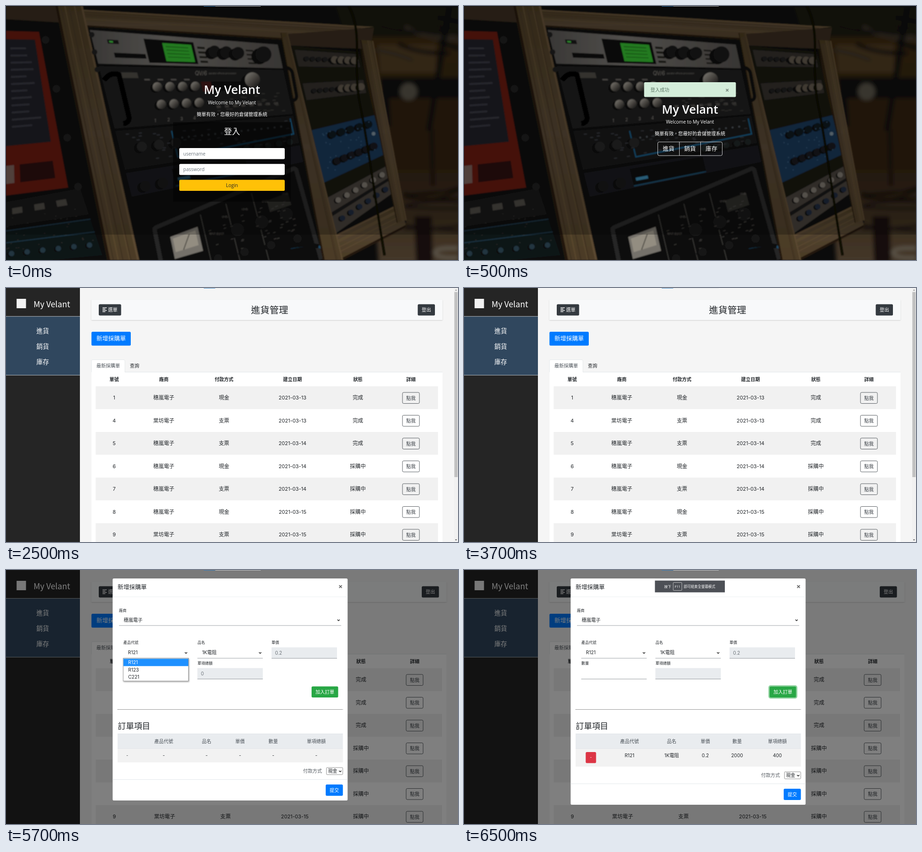
Recreate the animation shown at these times as an HTML page. Size 960 px wide and 540 px high, loop 8 s.

```html
<!DOCTYPE html>
<html lang="zh-Hant">
<head>
<meta charset="utf-8">
<title>My Velant</title>
<style>
html, body { margin: 0; width: 100%; height: 100%; overflow: hidden; background: #0b0b0b; }
svg { display: block; width: 100vw; height: 100vh; }
text { font-family: Inter, "Noto Sans CJK TC", "Noto Sans CJK", sans-serif; font-weight: 300; white-space: pre; }
.ui { font-family: "Open Sans", "Noto Sans CJK TC", "Noto Sans CJK", sans-serif; font-weight: 400; }
.cjk { font-family: "Noto Sans CJK TC", "Noto Sans CJK", sans-serif; font-weight: 400; }
.reg { font-weight: 400; }
.mid { font-weight: 500; }
.semi { font-weight: 600; }
</style>
</head>
<body>
<svg id="stage" viewBox="0 0 960 540" preserveAspectRatio="none">
<defs>
<filter id="soft" x="-10%" y="-10%" width="120%" height="120%"><feGaussianBlur stdDeviation="4"/></filter>
<filter id="fine"><feGaussianBlur stdDeviation=".8"/></filter>
<filter id="shade" x="-5%" y="-20%" width="110%" height="150%"><feDropShadow dx="0" dy="1" stdDeviation="1.2" flood-opacity=".16"/></filter>
<filter id="drop" x="-10%" y="-10%" width="125%" height="135%"><feDropShadow dx="1" dy="1.5" stdDeviation="1.5" flood-opacity=".4"/></filter>
<linearGradient id="wood" x2="0" y2="1"><stop stop-color="#43361f"/><stop offset=".5" stop-color="#514230"/><stop offset="1" stop-color="#4b3b26"/></linearGradient>
<linearGradient id="wall" x2="0" y2="1"><stop stop-color="#33250f"/><stop offset=".6" stop-color="#2a1d0e"/><stop offset="1" stop-color="#45382a"/></linearGradient>
<linearGradient id="metal"><stop stop-color="#4c4a48"/><stop offset=".4" stop-color="#6b6864"/><stop offset="1" stop-color="#4a4744"/></linearGradient>
<linearGradient id="cap" y2="1"><stop stop-color="#aaa59c"/><stop offset=".5" stop-color="#5f5b55"/><stop offset="1" stop-color="#151413"/></linearGradient>
</defs>
</svg>
<script>
const BRAND = 'My Velant', SHOPS = ['穗嵐電子', '棠坊電子'], PAGES = ['進貨', '銷貨', '庫存'];
const DARK = '#212529', BLUE = '#007bff', COAL = '#343a40', GREY = '#6c757d', PALE = '#e9ecef';

// y is the visual middle of the line of text
const text = (x, y, s, size = 10, fill = DARK, cls = '', anchor = 'start') =>
  `<text x="${x}" y="${(y + size * .37).toFixed(2)}" font-size="${size}" fill="${fill}" class="${cls}" text-anchor="${anchor}">${s}</text>`;
const mid = (x, y, s, size, fill, cls) => text(x, y, s, size, fill, cls, 'middle');
const box = (x, y, x2, y2, fill, r = 0, more = '') =>
  `<rect x="${x}" y="${y}" width="${x2 - x}" height="${y2 - y}" rx="${r}" fill="${fill}" ${more}/>`;
const path = (d, color, w = 1, more = '') => `<path d="${d}" fill="none" stroke="${color}" stroke-width="${w}" ${more}/>`;
const poly = (points, fill) => `<polygon points="${points}" fill="${fill}"/>`;
const dot = (x, y, r, fill) => `<circle cx="${x}" cy="${y}" r="${r}" fill="${fill}"/>`;
const rule = (x, x2, y, color = '#dee2e6', w = .8) => path(`M${x} ${y}H${x2}`, color, w);
const group = (s, more = '') => `<g ${more}>${s}</g>`;
const times = (n, f) => Array.from({ length: n }, (_, i) => f(i)).join('');
const each = (list, f) => list.map(f).join('');
const button = (x, y, x2, y2, fill, s, size = 10, color = '#fff', cls = '') =>
  box(x, y, x2, y2, fill, 2.5) + mid((x + x2) / 2, (y + y2) / 2, s, size, color, cls);
const outline = (x, y, x2, y2, color, r = 2.5, w = .8) => box(x, y, x2, y2, 'none', r, `stroke="${color}" stroke-width="${w}"`);
const chevron = (x, y) => path(`M${x - 2.4} ${y - 1.2}l2.4 2.4l2.4 -2.4`, '#111', 1.3);
const cross = (x, y, r, color) => path(`M${x - r} ${y - r}l${2 * r} ${2 * r}m0 ${-2 * r}l${-2 * r} ${2 * r}`, color, 1.7);

let seed = 7;
const rnd = (a, b) => a + (b - a) * (seed = seed * 16807 % 2147483647) / 2147483647;
const mix = (a, b, k) => a + (b - a) * k;

// a flat surface seen at an angle, given by its corners; u runs across, v down
function face(tl, tr, bl, br) {
  const at = (u, v) => [0, 1].map(k => +mix(mix(tl[k], tr[k], u), mix(bl[k], br[k], u), v).toFixed(1));
  const patch = (u, v, u2, v2, fill) => poly([at(u, v), at(u2, v), at(u2, v2), at(u, v2)].join(' '), fill);
  const spot = (u, v, r, fill) => dot(...at(u, v), r, fill);
  const row = (n, u, u2, f) => times(n, i => f(mix(u, u2, n > 1 ? i / (n - 1) : 0), i));
  const knobs = (n, u, u2, v, r, fill = '#161616') => row(n, u, u2, k => {
    const [x, y] = at(k, v);
    return dot(x - r * .5, y + r * .25, r, '#070707') + dot(x, y, r, fill);
  });
  const marks = (n, u, v, u2, v2, fill) => times(n, () => {
    const a = rnd(u, u2), b = rnd(v, v2);
    return patch(a, b, a + .018, b + .007, fill);
  });
  const label = (u, v, s, size, fill = '#8d8982') => text(...at(u, v), s, size, fill);
  return { at, patch, spot, row, knobs, marks, label };
}

function room() {
  const back = face([785, 0], [965, 0], [820, 545], [965, 545]);
  return group(
    back.patch(-.2, 0, 1, 1, 'url(#wall)') +
    back.patch(-.6, 0, 1, .12, '#17130d') +
    back.patch(0, .15, .7, .26, '#43331a') +
    back.patch(0, .28, 1, .47, '#0e0c0a') +
    back.patch(.1, .36, 1, .48, '#2b1e0e') +
    back.patch(.6, .48, .65, .7, '#120d08') +
    back.patch(.35, .82, .6, 1, '#15110d') +
    times(9, i => path(`M${rnd(785, 930)} ${rnd(20, 100)}q40 ${rnd(-5, 30)} ${rnd(60, 150)} ${rnd(0, 30)}`, i % 3 ? '#0c0a08' : '#332c22', rnd(4, 10))) +
    times(8, () => path(`M845 ${rnd(370, 480)}q50 ${rnd(-30, 40)} 120 ${rnd(-30, 20)}`, '#130f0b', 5)) +
    path('M942 0L898 265M785 187H960', '#0a0908', 12) +
    path('M960 535C900 540 890 510 960 515', '#5c5548', 7) + dot(855, 182, 18, '#4b463c'), 'filter="url(#soft)"');
}

function leftRack() {
  const poster = face([0, 53], [70, 55], [0, 403], [132, 386]), low = face([0, 410], [155, 380], [0, 550], [205, 530]);
  return box(0, 0, 215, 540, '#0d0d0d') + poly('0,0 105,0 115,35 0,28', '#33281a') +
    poster.patch(0, 0, 1, 1, '#5c1710') + poster.patch(0, .05, .84, .7, '#1b1b21') +
    poster.row(12, .1, .58, v => poster.patch(.12, v, .62 + rnd(-.15, .1), v + .012, '#30313a')) +
    poster.patch(.24, .82, .82, .93, '#280d0b') + poster.patch(0, .82, .14, .93, '#6b5450') +
    low.patch(0, .05, 1, .42, '#171717') + low.patch(0, .5, 1, 1, '#0f1214') + low.patch(0, .48, 1, .495, '#1b3645') + low.patch(0, .66, 1, .675, '#1b3645') +
    low.row(3, .08, .65, u => low.patch(u, .16, u + .13, .25, '#45423e')) +
    low.knobs(6, .06, .9, .84, 6, '#22343f') + low.marks(30, 0, .3, .95, .8, '#3b3a38') +
    times(4, i => dot(84 + i * 23, 72 + i * 104, 8, '#1e1d1c'));
}

function units() {
  const f = face([178, 51], [577, 82], [268, 409], [632, 334]), corner = f.at(.31, .63);
  return poly('165,0 700,0 850,460 716,540 283,540', '#0e0e0e') +
    // silver unit
    f.patch(0, 0, 1, .2, 'url(#metal)') + f.patch(.28, .03, .545, .185, '#0b0c0b') + f.patch(.375, .05, .53, .172, '#2fa32a') +
    f.row(4, .07, .14, v => f.patch(.39, v, .51, v + .006, '#1d6f1c')) +
    f.patch(.08, .05, .14, .075, '#171716') + f.patch(.09, .058, .11, .068, '#3cb43c') + f.patch(.1, .13, .27, .16, '#111') +
    f.row(4, .06, .16, v => f.patch(.56, v, .6, v + .015, '#1a1a19') + f.patch(.82, v, .86, v + .012, '#1a1a19')) +
    f.knobs(3, .648, .775, .09, 13) + f.knobs(1, .911, 0, .09, 17) +
    // effects unit
    f.patch(0, .215, 1, .585, '#1d1d1d') + f.patch(.1, .25, .2, .285, '#45423e') +
    f.label(.515, .25, 'QV/6', 11) + f.label(.59, .25, 'parallel effects processor', 5) +
    f.patch(.535, .31, .755, .38, '#0a0a0a') + f.patch(.535, .31, .59, .38, '#3d1512') +
    f.knobs(4, .291, .5, .342, 10, 'url(#cap)') + f.knobs(4, .29, .5, .456, 10, 'url(#cap)') + f.knobs(1, .82, 0, .297, 16, 'url(#cap)') +
    f.row(4, .23, .447, (u, i) => f.label(u, .555, i + 1, 9) + f.patch(u, .29, u + .03, .3, '#5a5752')) +
    f.row(8, .59, .91, u => f.patch(u, .48, u + .022, .5, '#45423f')) + f.marks(30, .56, .4, .95, .55, '#393734') +
    path('M208 158Q222 139 240 146L261 235Q263 248 249 250', '#060606', 11) +
    // blue framed unit
    f.patch(0, .6, 1, .83, '#151617') + path(`M${corner}L${f.at(.31, .8)}L${f.at(.98, .75)}L${f.at(.98, .62)}`, '#195a80', 2.5) +
    f.row(16, .36, .92, u => f.spot(u, .68, 2, '#4b5054')) + f.knobs(3, .125, .32, .708, 11, '#202020') + f.knobs(5, .7, .95, .81, 7, '#1f2021') +
    f.marks(40, .05, .62, .95, .8, '#34363a') +
    // dark unit
    f.patch(0, .85, 1, .99, '#16181a') + f.patch(.26, .87, .68, .975, '#08090a') + f.patch(.26, .975, .68, .983, '#1b4a66') +
    f.patch(.28, .93, .35, .95, '#35799c') + f.knobs(2, .088, .19, .945, 11, '#131416');
}

function amp() {
  const f = face([320, 475], [612, 350], [345, 600], [665, 540]), edge = (u, v) => f.at(u, v);
  return path(`M${edge(0, 1)}L${edge(0, 0)}L${edge(1, 0)}L${edge(1, 1)}`, '#262525', 18, 'stroke-linejoin="round"') +
    f.patch(0, 0, 1, 1, '#101010') +
    f.row(3, .31, .68, u => f.patch(u, .05, u + .004, 1, '#454340')) +
    f.patch(.08, .2, .275, .56, '#75716a') + f.patch(.095, .24, .255, .46, '#938d81') +
    path(`M${f.at(.15, .46)}L${f.at(.21, .26)}`, '#2a2825', 1.5) +
    f.knobs(3, .53, .87, .42, 14) + f.knobs(4, .36, .9, .72, 9) + f.patch(.77, .2, .92, .34, '#2b2927') +
    f.row(4, .45, .88, u => f.label(u, .19, 'LEVEL', 4.5)) + f.label(.34, .35, 'INPUT SELECT', 4.5) + f.marks(40, .34, .25, .93, .7, '#454340') +
    path('M604 514C650 505 680 505 688 540', '#1d4a66', 5) + path('M600 512Q635 504 664 511', '#0a0a0a', 9);
}

function rightRack() {
  const f = face([607, 85], [750, 97], [701, 483], [822, 397]);
  return f.patch(0, 0, 1, 1, '#131211') +
    each([.02, .2], v => f.patch(.03, v, .96, v + .09, '#2d2a27') + f.knobs(5, .18, .55, v + .045, 5, '#1c1b1a') + f.knobs(4, .6, .9, v + .045, 8, '#544d43')) +
    f.patch(0, .45, 1, .73, '#123250') + f.knobs(5, .3, .88, .5, 8, '#10151b') + f.knobs(6, .28, .88, .65, 8, '#14191e') +
    f.marks(30, .1, .47, .92, .7, '#33516b') + f.spot(.92, .57, 4, '#6d7d88') +
    f.patch(0, .81, 1, 1, '#403b35') + f.patch(0, .89, 1, .91, '#191715') +
    f.knobs(6, .15, .9, .85, 6, '#6f6a63') + f.knobs(6, .15, .9, .95, 6, '#1e2638');
}

function plank(...corners) {
  const f = face(...corners);
  return f.patch(0, 0, 1, 1, 'url(#wood)') + f.patch(0, 0, .09, 1, '#211709') + f.patch(.93, 0, 1, 1, '#5c4a33') +
    times(5, () => { const u = rnd(.15, .85); return f.patch(u, 0, u + .04, 1, rnd(0, 1) > .5 ? '#58472f' : '#413320'); });
}

const frame = () =>
  plank([170, 44], [163, 8], [590, 72], [782, 44]) + poly('590,60 782,46 774,92 604,84', '#30251a') +
  plank([105, 0], [163, 0], [215, 540], [283, 540]) +
  plank([716, 540], [700, 487], [850, 470], [838, 419]) +
  plank([583, 57], [598, 57], [673, 540], [716, 540]) +
  plank([752, 72], [780, 74], [830, 461], [851, 455]) +
  path('M588 132Q607 128 609 147L617 190Q618 201 607 201', '#080808', 7) +
  path('M728 0C760 60 735 130 752 210S785 420 804 530', '#080706', 5) +
  times(3, i => dot(182 + i * 6, 61 + i * 37, 6, '#1f1d1a'));

const photo = () => room() + group(leftRack() + units() + amp() + rightRack() + frame(), 'filter="url(#fine)"') +
  box(0, 0, 960, 486, 'rgba(0,0,0,.25)');

const heading = y => mid(480, y, BRAND, 25, '#fff', 'ui semi') + mid(480, y + 27, 'Welcome to ' + BRAND, 9.9, '#fff', 'ui mid') +
  mid(480, y + 51.8, '簡單有效，您最好的倉儲管理系統', 10, '#fff', 'ui');

function login() {
  const field = (y, s) => box(368, y, 592, y + 23.5, '#fff', 2.5) + text(376.5, y + 12, s, 10, GREY, 'ui');
  return box(355, 247, 605, 416, 'rgba(0,0,0,.5)') + heading(178) + mid(480, 266.3, '登入', 17, '#fff') +
    field(302, 'username') + field(335.7, 'password') + button(368, 369.5, 592, 393, '#ffc107', 'Login', 10, DARK, 'ui');
}

const home = () => box(382.5, 162, 577.5, 193.5, '#d4edda', 2.5) + text(396, 178, '登入成功', 10, '#5f7a68') + cross(559, 179, 2.6, '#7b8a80') +
  heading(219.5) + outline(411.5, 289, 548.5, 318, '#f8f9fa', 3) + path('M457.5 289V318M502.5 289V318', '#f8f9fa', .8) +
  each(PAGES, (s, i) => mid(434.5 + i * 45.5, 303.8, s, 12.5, '#fff', 'ui'));

const sidebar = () => box(0, 0, 157, 540, '#252525') + box(0, 60, 157, 185.5, '#30475e') +
  rule(0, 157, 60.3, '#d8d8d8') + rule(0, 157, 185.3, '#d8d8d8') +
  box(22.5, 23, 42.5, 43, '#f2f2f2') + text(58.5, 34.3, BRAND, 17.3, '#fff', 'cjk') +
  each(PAGES, (s, i) => mid(78, 90.5 + i * 33, s, 13.5, '#fff', 'cjk mid'));

const COLUMNS = { 單號: .054, 廠商: .199, 付款方式: .375, 建立日期: .575, 狀態: .766, 詳細: .921 };

function list(right) {
  const left = 190.5, end = right - 9.5;
  const cols = Object.values(COLUMNS).map(k => mix(left, end, k));
  const row = (pay, i) => {
    const y = 209 + i * 48.5, x = cols[5], id = i ? i + 3 : 1, day = 13 + Math.floor((i + 1) / 3);
    const cells = [id, SHOPS[id % 5 === 4 ? 1 : 0], pay, '2021-03-' + day, i < 3 ? '完成' : '採購中'];
    return (i % 2 ? '' : box(left, y, end, y + 48.5, '#f1f1f1')) +
      each(cells, (s, k) => mid(cols[k], y + 24, s, k % 3 ? 11.2 : 10.8, DARK, k % 3 ? '' : 'reg')) +
      outline(x - 18, y + 13, x + 18, y + 36.5, COAL) + mid(x, y + 24.8, '點我', 10, COAL);
  };
  return box(0, 0, 960, 540, '#f5f5f5') + sidebar() +
    box(181.5, 25, right, 68, '#f8f9fa', 0, 'filter="url(#shade)"') +
    box(197, 34.5, 244.5, 58.5, COAL, 2.5) + times(4, i => rule(205, i % 2 ? 211 : 214, 42 + i * 2.8, '#fff', 1.4)) +
    text(216.8, 46.5, '選單', 10, '#fff') + mid((181.5 + right) / 2 + 5.5, 46.3, '進貨管理', 19.8) +
    button(right - 52.5, 34.5, right - 16, 58.5, COAL, '登出') +
    button(181.5, 93, 265, 122.5, BLUE, '新增採購單', 12.5) +
    box(181.5, 179, right, 540, '#fff') + rule(252.5, right, 178.8) +
    `<path d="M181.5 179V155Q181.5 152.5 184 152.5H250Q252.5 152.5 252.5 155V179" fill="#fff" stroke="#dee2e6" stroke-width=".7"/>` +
    text(192, 165.5, '最新採購單', 10, '#495057') + text(263, 165.5, '查詢') +
    each(Object.keys(COLUMNS), (s, i) => mid(cols[i], 194, s, 10, DARK, 'semi')) +
    each(['現金', '支票', '支票', '現金', '支票', '現金', '支票'], row);
}

const scrollbar = () => box(951.5, 0, 960, 540, '#f1f1f1') + box(952.3, 8.5, 959.2, 402, '#c1c1c1') +
  poly('953.7,5.5 957.9,5.5 955.8,3', '#8a8a8a') + poly('953.7,534.5 957.9,534.5 955.8,537', '#505050');

const select = (x, x2, y, s, color = '#8b9096') => text(x + 10, y, s, 10, DARK, 'reg') + chevron(x2 - 5.7, y + .7) + rule(x, x2, y + 12, color);
const locked = (x, y, s) => box(x, y, x + 139, y + 23.3, PALE) + rule(x, x + 139, y + 23.3, '#7d838a') + text(x + 7.5, y + 11.5, s, 10, '#495057');

function modal(added) {
  const d = added ? 9 : 0;
  const cols = added ? [351.5, 441, 512.5, 580, 665.5] : [335, 426, 497, 567.5, 659];
  const item = added ? ['R121', '1K電阻', '0.2', '2000', '400'] : Array(5).fill('-');
  return box(0, 0, 960, 540, 'rgba(0,0,0,.5)') + box(226.5, 18, 725.5, 490 + d, '#fff', 2.5) +
    text(237, 36.8, '新增採購單', 12.4) + cross(710.5, 35.3, 2.9, '#666') + rule(226.5, 725.5, 57, PALE) +
    text(240, 85.8, '廠商', 8) + select(240, 712, 106, SHOPS[0]) +
    each(['產品代號', '品名', '單價'], (s, i) => text(249.3 + i * 157.4, 154, s, 8)) +
    select(249, 388, 175.5, 'R121', added ? '#8b9096' : '#333') + select(406.5, 545.5, 175.5, '1K電阻') + locked(564, 164.5, '0.2') +
    text(249.3, 198.5, '數量', 8) + rule(249, 388, 231.8, '#7d838a') +
    text(406.7, 198.5, '單項總額', 8) + locked(406.5, 208.5, added ? '' : '0') +
    (added ? outline(647.7, 246.3, 706.8, 272.2, '#93d3a2', 3.6, 2.5) : '') +
    button(649, 247.5, 705.5, 271, '#28a745', '加入訂單') +
    path('M237 296.5H715.5', '#333', 1, 'stroke-dasharray="1 1"') + text(237.5, 332, '訂單項目', 17.2) +
    box(237, 348, 715.5, 379.5, PALE) + box(237, 379.5, 715.5, 409 + d, '#f2f2f2') + rule(237, 715.5, 348.3) + rule(237, 715.5, 379.5) +
    each(['產品代號', '品名', '單價', '數量', '單項總額'], (s, i) => mid(cols[i], 364, s, 10, '#495057', 'mid')) +
    each(cols, (x, i) => mid(x, 394.5, item[i], 10, DARK, 'reg')) +
    (added ? button(258.5, 387, 280.5, 410.5, '#dc3545', '-') : mid(257.5, 394.5, '-', 10)) +
    text(631, 427.5 + d, '付款方式', 10, '#555b61') + outline(680.6, 420 + d, 715.2, 435 + d, '#767676', 1.5) +
    text(684, 427.5 + d, '現金', 9.7) + chevron(709.8, 428 + d) + rule(226.5, 725.5, 445.5 + d) +
    button(679, 456 + d, 715.5, 480 + d, BLUE, '提交');
}

const dropdown = () => box(249, 187.5, 387.6, 236, '#fff', 0, 'stroke="#767676" stroke-width=".7" filter="url(#drop)"') +
  box(249.4, 188.7, 387.2, 204.3, '#1e90ff') +
  each(['R121', 'R123', 'C221'], (s, i) => text(259.5, 196.6 + i * 15.4, s, 10, i ? DARK : '#fff', 'reg'));

const toast = () => box(405.5, 22.5, 554, 47.5, '#4d5056') + text(425.3, 35, '按下', 7.4, '#fff', 'cjk') +
  outline(444.3, 26.5, 462.7, 43.5, '#e4e4e4', 1.5, .7) + mid(453.5, 35, 'F11', 7.2, '#fff', 'ui') +
  text(466.8, 35, '即可結束全螢幕模式', 7.45, '#fff', 'cjk');

const LOOP = 8000;
// start, end, content
const layers = [
  [0, 2500, photo()],
  [0, 500, login()],
  [500, 2500, home()],
  [2500, 4500, list(927) + scrollbar()],
  [4500, LOOP, list(935.5)],
  [4500, 6500, modal(false) + dropdown()],
  [6500, LOOP, modal(true) + toast()],
  [0, LOOP, box(420, 0, 444.5, .8, '#2f7fc4') + box(444.5, 0, 541, .7, '#dfe3e6')]
];
const stage = document.getElementById('stage');
stage.insertAdjacentHTML('beforeend', each(layers, l => group(l[2], 'class="layer"')));
const nodes = stage.querySelectorAll('.layer');

function draw() {
  const t = performance.now() % LOOP;
  layers.forEach(([from, to], i) => { nodes[i].style.display = t >= from && t < to ? '' : 'none'; });
  requestAnimationFrame(draw);
}
draw();
</script>
</body>
</html>
```
